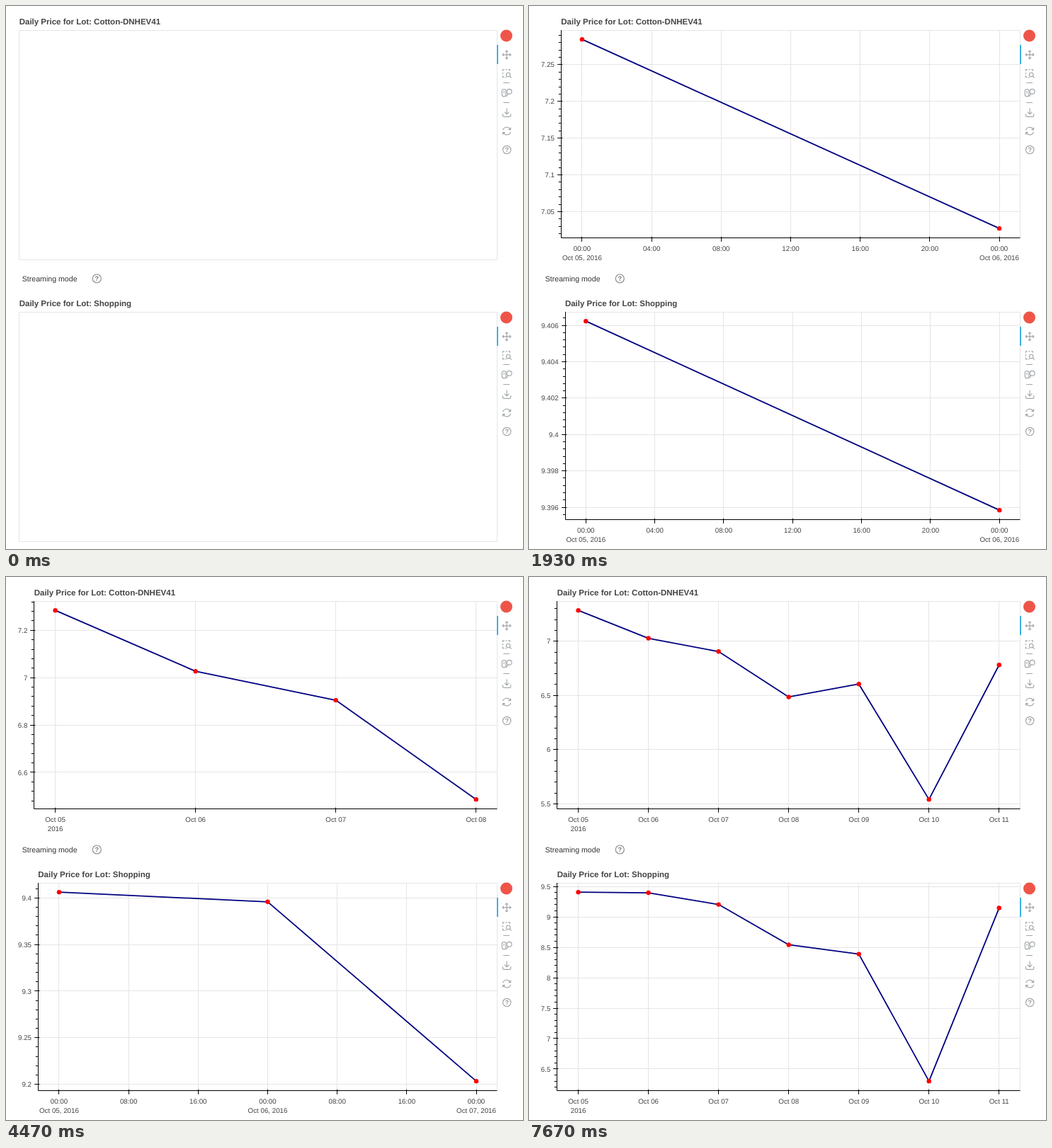
Animation of 730 by 767 pixels, one loop 8 s. Source, as an HTML page:

```html
<!DOCTYPE html>
<html lang="en">
<head>
<meta charset="utf-8">
<title>Streaming charts</title>
<style>
  html, body { margin: 0; width: 100%; height: 100%; overflow: hidden; background: #fff; }
  svg { display: block; width: 730px; height: 767px; }
  text { font-family: "Liberation Sans", Arial, sans-serif; font-size: 9.75px; fill: #444; text-rendering: geometricPrecision; }
  .title { font-size: 11.5px; font-weight: bold; }
  .mode { font-size: 10.6px; fill: #333; }
  .grid { stroke: #e5e5e5; fill: none; }
  .axis { stroke: #000; fill: none; }
  .line { stroke: navy; stroke-width: 1.8; fill: none; stroke-linejoin: round; }
  .dot { fill: red; }
  .mid { text-anchor: middle; }
  .end { text-anchor: end; }
  .icon { stroke: #a1a6a9; stroke-width: 1.15; fill: none; stroke-linejoin: round; }
  .icon text { stroke: none; fill: #999; font-size: 9px; font-weight: bold; }
</style>
</head>
<body>
<svg viewBox="0 0 730 767">
  <defs>
    <g id="tools">
      <circle cx="706.5" cy="42" r="8.5" fill="#ee5548"/>
      <path d="M694 55v27" stroke="#26aae1" stroke-width="1.8"/>
      <g class="icon">
        <path d="M707 62.8v12M701 68.8h12M705.1 64.7l1.9-1.9 1.9 1.9M705.1 72.9l1.9 1.9 1.9-1.9M702.9 66.9l-1.9 1.9 1.9 1.9M711.1 66.9l1.9 1.9-1.9 1.9"/>
        <path d="M701.5 92v-2.2h2.2M705.4 89.8h2M709.2 89.8h2.2v2M701.5 94v2.2M701.5 98.2v2.6h2.2M705 100.8h1.6"/>
        <circle cx="709.2" cy="97" r="2.8"/>
        <path d="M711.3 99.1l2.4 2.5M702.2 108.5h8.8M702.2 136.5h8.8"/>
        <rect x="700.3" y="117.5" width="5.6" height="10.4" rx="2.8"/>
        <path d="M703.1 120v3"/>
        <circle cx="710.6" cy="120.8" r="3.5"/>
        <path d="M708.6 123.6l-2 4.6"/>
        <path d="M701.5 152.3v2.8q0 1.2 1.2 1.2h8.8q1.2 0 1.2-1.2v-2.8M707.1 144.5v8.2M703.9 149.6l3.2 3.2 3.2-3.2"/>
        <path d="M701.6 175.4a5.5 5.5 0 0 1 10.2-1.2M712.6 171.4v3.2h-3.2M712.6 177.8a5.5 5.5 0 0 1-10.2 1.2M701.6 181.8v-3.2h3.2"/>
        <circle cx="707.2" cy="203" r="5.7"/>
        <text class="mid" x="707.2" y="206.2">?</text>
      </g>
    </g>
  </defs>
  <g id="top"></g>
  <use href="#tools"/>
  <text class="mode" x="22.8" y="388.6">Streaming mode</text>
  <g class="icon" style="stroke:#8c8c8c">
    <circle cx="128.3" cy="385" r="6"/>
    <text class="mid" x="128.3" y="388.2" style="fill:#777">?</text>
  </g>
  <g id="low" transform="translate(0 398)"></g>
  <use href="#tools" y="398"/>
</svg>
<script>
const LOOP = 8000, TOP = 33.8, RIGHT = 693.5;

const charts = {
  top: { name: "Cotton-DNHEV41", data: [7.2844, 7.0272, 6.9047, 6.4857, 6.605, 5.541, 6.781] },
  low: { name: "Shopping", data: [9.40623, 9.39584, 9.2033, 8.5417, 8.3888, 6.3, 9.1454] }
};

// [start ms, points in upper chart, points in lower chart]
const steps = [
  [0, 0, 0], [1130, 1, 2], [1930, 2, 2], [3000, 3, 2], [3070, 3, 3],
  [4470, 4, 3], [4930, 4, 4], [6600, 5, 7], [7670, 7, 7]
];

const snap = v => Math.floor(v) + 0.5;
const pad = v => String(v).padStart(2, "0");
const path = (cls, d) => `<path class="${cls}" d="${d}"/>`;
const text = (cls, x, y, s) => `<text class="${cls}" x="${x}" y="${y}">${s}</text>`;
const title = (x, name) => text("title", x - 0.2, 26, "Daily Price for Lot: " + name);
const frame = (left, bottom) => `M${left} 34.5H${RIGHT}V${bottom}H${left}Z`;

// Round step (1, 2 or 5 times a power of ten) giving close to six ticks
function tickStep(span) {
  const mag = 10 ** Math.floor(Math.log10(span / 6));
  const miss = s => Math.abs(6 - span / s);
  return [1, 2, 5, 10].map(k => k * mag).reduce((a, b) => miss(b) < miss(a) ? b : a);
}

function ticks(lo, hi, step) {
  const out = [];
  for (let i = Math.ceil(lo / step - 1e-6); i * step <= hi + step * 1e-6; i++) out.push(i * step);
  return out;
}

// Share of the plot width at which a day stands
function place(day, n) {
  return n === 1 ? 0.5 : (0.5 + 10 * day / (n - 1)) / 11;
}

// Time ticks as [place from 0 to 1, label lines]
function timeTicks(n) {
  if (n === 1) return [
    [0, ["999000us", "23:59:59", "Oct 04, 2016"]], [0.25, ["999500us"]],
    [0.5, ["0us", "00:00:00", "Oct 05, 2016"]], [0.75, ["500us"]], [1, ["1000us"]]
  ];
  const hours = n === 2 ? 4 : n === 3 ? 8 : 24, out = [];
  for (let h = 0; h <= 24 * (n - 1); h += hours) {
    const day = "Oct " + pad(5 + Math.floor(h / 24));
    const lines = hours === 24 ? [day] : [pad(h % 24) + ":00"];
    if (hours === 24 && h === 0) lines.push("2016");
    if (hours < 24 && h % 24 === 0) lines.push(day + ", 2016");
    out.push([place(h / 24, n), lines]);
  }
  return out;
}

function chart({ name, data }, n) {
  if (!n) return title(18.9, name) + path("grid", frame(18.5, 358.5));

  const pts = data.slice(0, n);
  let lo = Math.min(...pts), hi = Math.max(...pts);
  const margin = n === 1 ? 1 : (hi - lo) / 20;
  lo -= margin;
  hi += margin;

  const step = tickStep(hi - lo), major = ticks(lo, hi, step);
  const labels = major.map(v => String(+v.toFixed(4)));
  const chars = Math.max(...labels.map(s => s.length));
  const left = 39.9 + 5.6 * (chars - 3), edge = snap(left);
  const bottom = n === 1 ? 314.5 : 327.5;
  const X = f => left + f * (RIGHT - left);
  const Y = v => bottom - (v - lo) / (hi - lo) * (bottom - TOP);

  let grid = frame(edge, bottom);
  let axis = `M${edge} 34V${bottom}H${RIGHT}`;
  let out = "";

  major.forEach((v, i) => {
    const y = snap(Y(v));
    grid += `M${edge} ${y}H${RIGHT}`;
    axis += `M${edge - 5.3} ${y}h7.1`;
    out += text("end", left - 9.5, Y(v) + 3.6, labels[i]);
  });
  for (const v of ticks(lo, hi, step / 5)) axis += `M${edge - 3.6} ${snap(Y(v))}h3.6`;

  for (const [f, lines] of timeTicks(n)) {
    const x = snap(X(f));
    grid += `M${x} 34V${bottom}`;
    axis += `M${x} ${bottom - 1.8}v7.1`;
    lines.forEach((s, i) => out += text("mid", X(f), bottom + 18.8 + 12.3 * i, s));
  }

  const dots = pts.map((v, i) => [X(place(i, n)), Y(v)]);
  return title(left, name) + path("grid", grid) + path("axis", axis) + out +
    path("line", "M" + dots.join("L")) +
    dots.map(([x, y]) => `<circle class="dot" cx="${x}" cy="${y}" r="3.2"/>`).join("");
}

const start = performance.now();
let shown;

function draw(now) {
  const t = Math.max(0, now - start) % LOOP;
  const step = steps.findLast(s => s[0] <= t);
  if (step !== shown) {
    shown = step;
    document.getElementById("top").innerHTML = chart(charts.top, step[1]);
    document.getElementById("low").innerHTML = chart(charts.low, step[2]);
  }
  requestAnimationFrame(draw);
}
draw(start);
</script>
</body>
</html>
```
